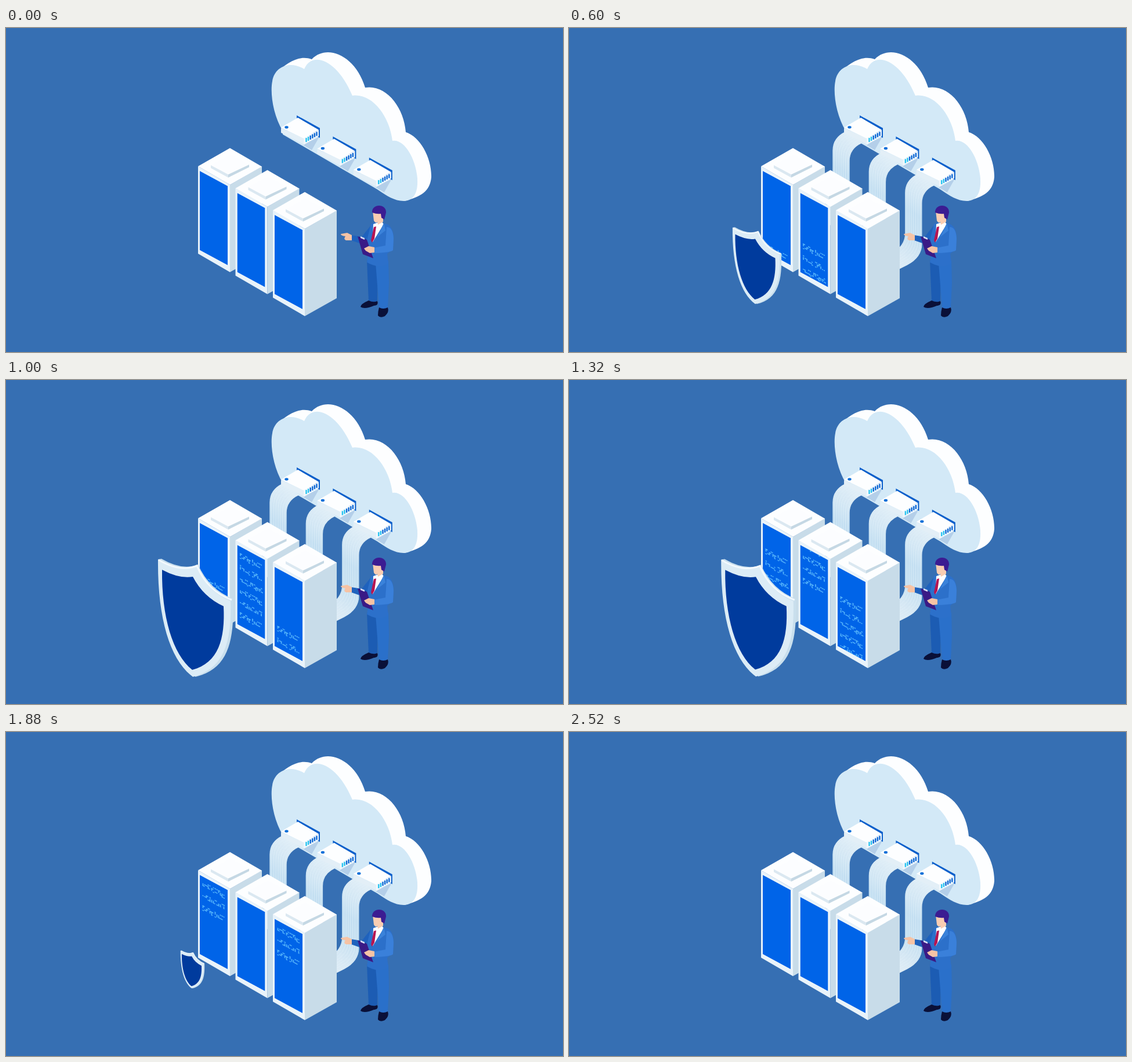
Animation, 960 px wide and 560 px high, one loop 2.56 s. Source, as an HTML page:

```html
<!DOCTYPE html>
<html lang="en">
<head>
<meta charset="utf-8">
<title>Cloud servers</title>
<style>
html, body { margin: 0; width: 100%; height: 100%; overflow: hidden; background: #366fb3; }
svg { display: block; }
</style>
</head>
<body>
<svg id="stage" width="100%" height="100%" viewBox="0 0 960 560"></svg>
<script>
const LOOP = 2560;
const poly = (points, fill) => `<polygon points="${points}" fill="${fill}"/>`;
const path = (d, fill, extra = '') => `<path d="${d}" fill="${fill}" ${extra}/>`;
const line = (d, color, width, extra = '') =>
  path(d, 'none', `stroke="${color}" stroke-width="${width}" ${extra}`);
const group = (content, attrs = '') => `<g ${attrs}>${content}</g>`;
const range = (n, fn) => Array.from({ length: n }, (_, i) => fn(i)).join('');
const three = (dx, dy, fn) =>
  range(3, i => group(fn(i), `transform="translate(${i * dx} ${i * dy})"`));

let seed = 11;
const random = () => (seed = seed * 16807 % 2147483647) / 2147483647;

// Cloud with its three drives
const cloud =
  path('M465 78C484 60 505 46 527 54C553 27 602 47 619 103C655 97 686 137 689 180C714 188 734 225 733 258C731 282 715 292 686 299L640 270Z', '#fdfeff') +
  path('M477 178C460 150 455 112 459 92C463 66 490 56 514 71C528 38 572 56 597 117C630 112 661 151 666 195C690 191 711 237 709 270C708 290 699 299 685 299C670 299 656 290 640 279L477 184Z', '#d3e9f7');

const slot = () =>
  poly('512,202 540,188 527,211', '#b4cfe9') +
  poly('501,151 541,173 541,190 501,167', '#0b5fcb');

const drive = () =>
  poly('474,173 513,191 513,201 474,181', '#e3eff7') +
  poly('513,191 539,176 539,187 513,202', '#f0f7fc') +
  poly('474,172 503,155 539,176 513,191', '#fdfeff') +
  '<ellipse cx="483.5" cy="171.500" rx="3.2" ry="2.3" fill="#1070d8"/>' +
  range(6, i => {
    const x = 517.5 + i * 3.6, y = 190 - i * 2.1;
    return line(`M${x} ${y}v7`, i < 2 ? '#26c3f0' : '#0c66d4', 2.4);
  });

// Each ribbon is a sheet of parallel strands
const ribbonShade = `<linearGradient id="shade" gradientUnits="userSpaceOnUse" x1="0" y1="180" x2="0" y2="325">
  <stop offset="0" stop-color="#e0eef7"/><stop offset=".4" stop-color="#c2def1"/>
  <stop offset=".7" stop-color="#c6e0f1"/><stop offset="1" stop-color="#e0edf6"/></linearGradient>`;
const strand = (i, color, width) =>
  line('M477 180Q455 190 455 212V282Q455 305 430 318L410 328', color, width,
    `class="strand" pathLength="1" stroke-dasharray="1 2" transform="translate(${i * 1.9 + .7} ${i * 1.26})"`);
const ribbon = () =>
  range(15, i => strand(i, 'url(#shade)', 2.8)) +
  range(7, i => strand(i * 2 + 1, '#e3f1fa', .6));

// Code rows on the screens
const glyphRows = Array.from({ length: 5 }, (_, row) => {
  let d = '';
  for (let x = 0; x < 39; x += 3) {
    if (row < 2 && x > 15 && x < 21) continue;
    const y = Math.floor(random() * 3) * 3 - 4;
    d += `M${x} ${y}h${random() < .6 ? 4 : 2}`;
    if (random() < .5) d += `M${x + 1} ${y}v${y > 0 ? -4 : 4}`;
    if (random() < .3) d += `M${x} ${y > 0 ? -4 : 4}h2.5`;
  }
  return d;
});
const code = range(6, i =>
  line(glyphRows[i % 5], '#55b4fb', 1.6, `transform="translate(4.5 ${i * 20.4})"`));

const server = () =>
  poly('331,239 386,271 386,422 331,390', '#e9f3fa') +
  poly('386,271 441,239 441,391 386,422', '#c8dce9') +
  poly('331,239 386,207.5 441,239.5 386,271', '#fdfeff') +
  poly('353,237 383,253 383,258.5 353,242', '#dbe8f1') +
  poly('383,253 419,236 419,240.5 383,258.5', '#c5d8e4') +
  poly('353,237 387,219 419,236 383,253', '#fcfdff') +
  group(`<svg width="48" height="137" overflow="hidden">
    <rect width="48" height="137" fill="#0064e8"/>${group(code, 'class="code"')}</svg>`,
    'transform="matrix(1 .54 0 1 334 247)"');

const man =
  path('M622 402L641 408L640 472Q632 476 625 472Z', '#1c5cb3') +
  path('M637 406L659 402L660 440L658 484Q650 488 643 483Z', '#2a70ca') +
  path('M625 471Q633 475 640 472Q643 479 634 480Q618 487 611 482Q611 477 625 471Z', '#0a1038') +
  path('M643 483Q650 487 658 483Q661 491 653 498Q645 502 641 497Q641 490 643 483Z', '#0a1038') +
  path('M629 341L613 361L595 358L595 367L612 373L628 364Z', '#1f62bd') +
  path('M596 358L588 354L577 356Q577 359 585 360Q581 365 586 367L596 367Z', '#f6c3a5') +
  path('M629 339L639 335L657 339Q667 344 668 362L667 382L657 390L659 407Q643 417 622 405L626 380L622 367Z', '#2c70ca') +
  path('M633 339L647 334L651 339L632 370Z', '#fff') +
  path('M634 344L638 343L635 364L631 371L629 367Z', '#b51552') +
  path('M651 337L654 350L640 361L632 375L645 351Z', '#3a82da') +
  path('M632 316L634 333Q638 339 640 335L641 340L650 335V316Z', '#f9cdb2') +
  path('M631 319C630 303 656 303 655 319L652 331L647 328L646 321Q639 322 631 319Z', '#3b1c92') +
  poly('606,360 622,366 633,398 615,391', '#3a1a86') +
  poly('611,360 618,363 618,366 611,363', '#d9dcf2') +
  path('M656 344Q667 344 668 364L667 384Q664 388 636 389L634 380L654 376Z', '#3a80da') +
  path('M635 379L625 377L617 381L620 385L627 389L635 388Z', '#f6c3a5');

const shield =
  path('M262 310L268 309Q304 330 331 319Q350 362 391 378C394 449 384 500 326 513Z', '#c9dfed') +
  path('M262 310Q300 333 328 321Q346 366 387 382C389 449 378 499 322 513C283 484 261 413 262 310Z', '#dcecf6') +
  line('M263 311Q301 333 329 321Q347 365 389 380', '#f3f9fd', 3) +
  path('M269 328Q299 344 322 340Q340 375 375 391C378 448 366 489 321 501C287 474 268 408 269 328Z', '#003b9d');

const stage = document.getElementById('stage');
stage.innerHTML =
  ribbonShade + '<rect width="960" height="560" fill="#366fb3"/>' + cloud +
  three(62.4, 36.5, slot) +
  group(three(62.4, 36.5, ribbon), 'id="ribbons"') +
  three(62.4, 36.5, drive) +
  three(64.5, 38, server) + man +
  group(shield, 'id="shield"');

const shieldNode = document.getElementById('shield');
const ribbonsNode = document.getElementById('ribbons');
const strands = stage.querySelectorAll('.strand');
const codes = stage.querySelectorAll('.code');

const progress = (t, start, duration) => Math.min(1, Math.max(0, (t - start) / duration));
const smooth = u => u * u * (3 - 2 * u);

const scrolls = [
  { start: 480, duration: 2160, from: 130, to: -118 },
  { start: 0, duration: 2000, from: 145, to: -112 },
  { start: 460, duration: 2160, from: 145, to: -118 }
];

function draw(t) {
  const grown = progress(t, 0, 520);
  ribbonsNode.setAttribute('visibility', grown > .02 ? 'visible' : 'hidden');
  strands.forEach(s => s.setAttribute('stroke-dashoffset', 1 - grown));

  scrolls.forEach(({ start, duration, from, to }, i) => {
    const y = from + (to - from) * smooth(progress(t, start, duration));
    codes[i].setAttribute('transform', `translate(0 ${y})`);
    codes[i].setAttribute('visibility', t > start ? 'visible' : 'hidden');
  });

  const scale = smooth(progress(t, 23, 960)) - smooth(progress(t, 1284, 960));
  shieldNode.setAttribute('transform',
    `translate(319 410) scale(${Math.max(0, scale)}) translate(-319 -410)`);
}

function tick() {
  draw(performance.now() % LOOP);
  requestAnimationFrame(tick);
}
tick();
</script>
</body>
</html>
```
